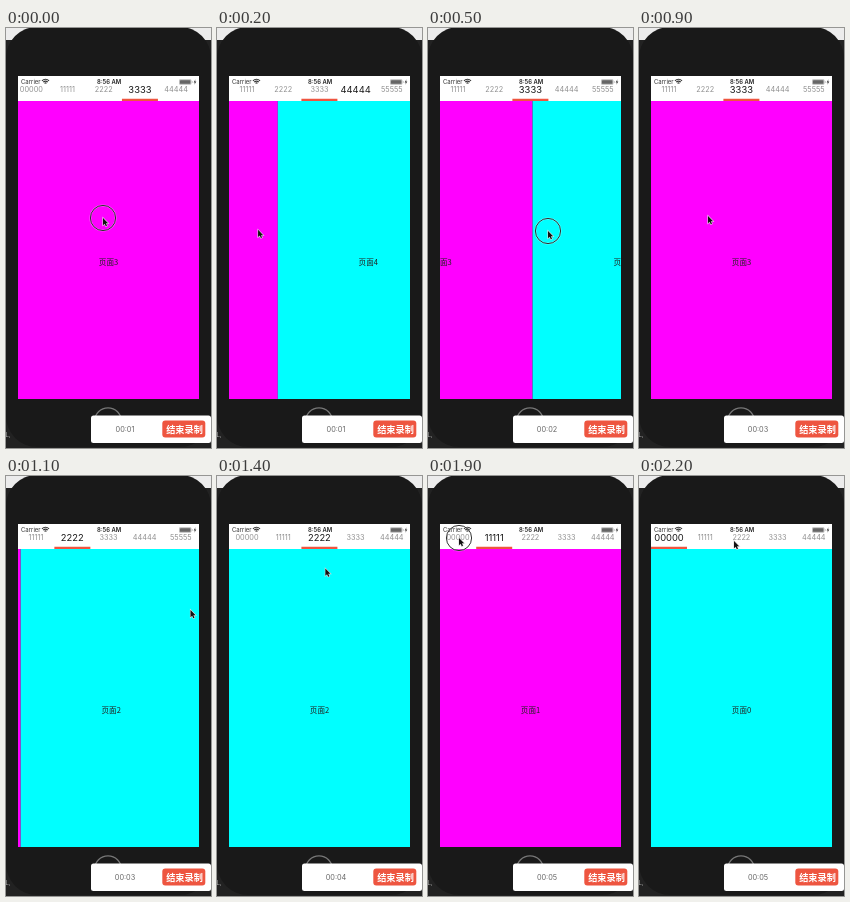
Animation of 205 by 420 pixels, one loop 2300 ms. Source, as an HTML page with a canvas:

```html
<!DOCTYPE html>
<html>
<head>
<meta charset="utf-8">
<style>
html, body { margin: 0; overflow: hidden; background: #222 }
canvas { display: block; width: 205px; height: 420px }
</style>
</head>
<body>
<canvas id="stage"></canvas>
<script>
const stage = document.getElementById('stage');
const g = stage.getContext('2d');
const dpr = window.devicePixelRatio || 1;
stage.width = 205 * dpr;
stage.height = 420 * dpr;

const STEP = 100, LOOP = 2300, W = 181, TAB = 36.2;
const LATIN = 'Inter, "Liberation Sans", sans-serif';
const CJK = '"Noto Sans CJK SC", "Noto Sans CJK", sans-serif';
const RED = '#ee5540';

// Times are in steps: the page slides from start for len, its tab lights up at pick.
const gestures = [
  { tab: 3, start: -9, len: 1, pick: -1.5 },
  { tab: 4, start: .8, len: 4.2, pick: 2 },
  { tab: 3, start: 4.55, len: 2.6, pick: 3.5 },
  { tab: 2, start: 9.95, len: 1.42, pick: 9.6 },
  { tab: 1, start: 15.5, len: .5, pick: 15.67 },
  { tab: 0, start: 19.5, len: .5, pick: 20 }
];
// Pointer stops: step, x, y
const stops = [[0, 97, 190], [3, 21.5, 206], [5, 120, 203], [6, 172, 200], [9, 69, 188],
               [11, 184.5, 134], [16, 67, 70], [19, 31, 62], [22, 95, 65]];

const clamp = (v, lo = 0, hi = 1) => Math.min(hi, Math.max(lo, v));
const smooth = p => p * p * (3 - 2 * p);
const easeOut = p => 1 - (1 - p) ** 2;
const overshoot = p => 1 + 1.65 * (p - 1) ** 3 + .65 * (p - 1) ** 2;

// Follows each gesture's goal in turn
const follow = (goal, progress, ease) =>
  gestures.reduce((v, e) => v + (goal(e.tab) - v) * ease(clamp(progress(e))), 0);

function pointerAt(k) {
  const i = clamp(stops.findIndex(s => s[0] > k), 1, stops.length - 1);
  const last = k >= stops[stops.length - 1][0];
  const [t0, x0, y0] = stops[last ? stops.length - 2 : i - 1];
  const [t1, x1, y1] = stops[last ? stops.length - 1 : i];
  const p = smooth(clamp((k - t0) / (t1 - t0)));
  return [x0 + (x1 - x0) * p, y0 + (y1 - y0) * p];
}

function stateAt(k) {
  return {
    page: follow(tab => tab, e => (k - e.start) / e.len, overshoot),
    bar: follow(tab => tab, e => (k - e.pick) / 1.5, easeOut),
    scroll: follow(tab => clamp(tab - 2), e => (k - e.pick - 1.4) / 1.5, easeOut),
    selected: gestures.filter(e => e.pick <= k).pop().tab,
    pressed: gestures.some(e => k > e.start - .9 && k < e.start + .5)
  };
}

function box(color, x, y, w, h, r = 0) {
  g.fillStyle = color;
  g.beginPath();
  g.roundRect(x, y, w, h, r);
  g.fill();
}

function text(str, x, y, size, color, family = LATIN, weight = 400) {
  g.font = `${weight} ${size}px ${family}`;
  g.fillStyle = color;
  g.fillText(str, x, y);
}

function ring(x, y, r, color, width, from = 0, to = 7) {
  g.strokeStyle = color;
  g.lineWidth = width;
  g.beginPath();
  g.arc(x, y, r, from, to);
  g.stroke();
}

function drawPhone() {
  box('#222', 0, 0, 205, 420);
  box('#ececec', 0, 0, 205, 12);
  text('L,', 2, 409, 6, '#aaa');
  box('#191919', 0, -1, 205, 420, 31);
  ring(102, 393.3, 13.4, '#777', 1.3);
}

function drawPages(page) {
  for (let i = 0; i < 6; i++) {
    const x = 12 + (i - page) * W;
    if (Math.abs(i - page) >= 1) continue;
    box(i % 2 ? '#f0f' : '#0ff', x, 73, W, 298);
    text('页面' + i, x + W / 2, 237, 7.6, '#222', CJK);
  }
}

function drawTabs({ selected, scroll, bar }) {
  const center = i => 30 + TAB * (i - scroll);
  box('#fff', 12, 48, W, 25);
  for (let i = 0; i < 6; i++) {
    const on = i === selected;
    const label = String(i).repeat(i === 2 || i === 3 ? 4 : 5);
    text(label, center(i), on ? 64.6 : 64, on ? 9.4 : 7.3, on ? '#1a1a1a' : '#909090');
  }
  box(RED, center(bar) - 18, 70.8, 36, 2.2);
}

function drawStatus() {
  text('Carrier', 24.8, 56, 6, '#333');
  text('8:56 AM', 103, 56, 5.9, '#222', LATIN, 600);
  for (const r of [1.4, 3.2, 5]) ring(39.5, 56.3, r, '#333', 1.1, -Math.PI * .75, -Math.PI * .25);
  box('#bbb', 173, 51.3, 12.4, 5.4, 1.3);
  box('#666', 174, 52.2, 10.4, 3.6, .6);
  box('#bbb', 185.8, 53, .8, 2);
  g.fillStyle = '#333';
  g.fill(new Path2D('M189.4 51.2l-1.7 3.2h1.2l-.5 2.4 1.9-3.3h-1.2z'));
}

function drawRecorder(k) {
  box('#fff', 85, 387.5, 120, 27.5, 2.5);
  text('00:0' + (1 + Math.floor((k + 2) / 5)), 119, 404, 7.3, '#666');
  box(RED, 156.3, 392.6, 43, 16.8, 3);
  text('结束录制', 178.5, 404.5, 9.2, '#fff', CJK, 700);
}

function drawPointer([x, y], pressed) {
  if (pressed) {
    ring(x, y, 12.6, 'rgba(255,255,255,.35)', 2);
    ring(x, y, 12.6, '#333', 1);
  }
  g.save();
  g.translate(x, y);
  g.scale(.8, .8);
  const arrow = new Path2D('M0 0V9L2.1 7.1 3.5 10.3 5 9.6 3.6 6.6H6.4Z');
  g.strokeStyle = '#ddd';
  g.lineWidth = 1.4;
  g.stroke(arrow);
  g.fillStyle = '#111';
  g.fill(arrow);
  g.restore();
}

function draw(now) {
  const k = Math.floor(now % LOOP / STEP);
  const state = stateAt(k);
  g.setTransform(dpr, 0, 0, dpr, 0, 0);
  g.textAlign = 'center';
  drawPhone();
  g.save();
  g.beginPath();
  g.rect(12, 48, W, 323);
  g.clip();
  drawPages(state.page);
  drawTabs(state);
  drawStatus();
  g.restore();
  drawRecorder(k);
  drawPointer(pointerAt(k), state.pressed);
}

const start = performance.now();
function tick() {
  draw(performance.now() - start);
  requestAnimationFrame(tick);
}
tick();
</script>
</body>
</html>
```
